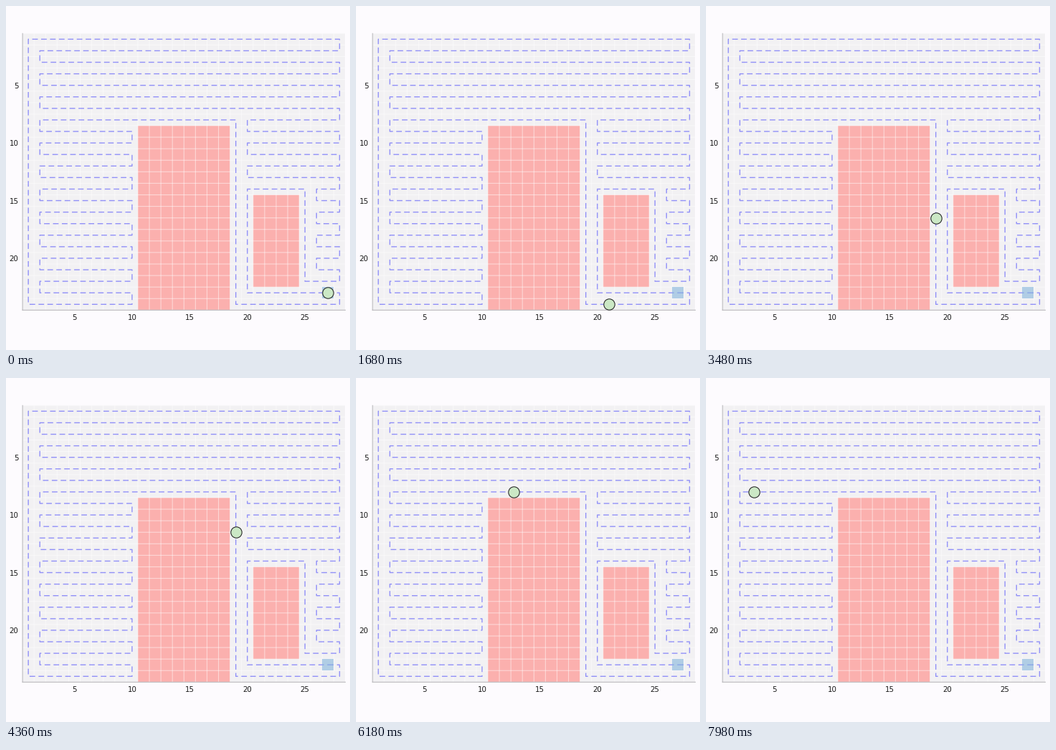
Animation of 480 by 480 pixels, one loop 8000 ms. Source, as a matplotlib script:

```python
import numpy as np
import matplotlib.pyplot as plt
from matplotlib.animation import FuncAnimation
from matplotlib.patches import Rectangle

SIZE, DPI = 480, 80
PX = 72 / DPI                 # one pixel in points
COLS, ROWS, CELL = 28, 24, 16.085
LEFT, TOP = 23.1, 38.3
STEP = 0.25                   # cells travelled per step
HOME = (27, 23)

plt.rcParams["font.family"] = "DejaVu Sans"
plt.rcParams["lines.scale_dashes"] = False


def sweep(first, last, start, end):
    """Corners of a back-and-forth sweep over rows first..last."""
    pts = []
    for y in range(first, last + 1):
        pts += [(start, y), (end, y)]
        start, end = end, start
    return pts


route = [HOME, (28, 23), (28, 24), (19, 24), (19, 8), (2, 8)]
route += sweep(9, 23, 2, 10)
route += [(10, 24), (1, 24), (1, 1), (28, 1)]
route += sweep(2, 7, 28, 2)
route += sweep(8, 13, 28, 20)
route += sweep(14, 21, 28, 26)
route += [(28, 22), (25, 22), (25, 14), (20, 14), (20, 23), HOME]
route = np.array(route, float)
dist = np.r_[0, np.cumsum(np.abs(np.diff(route, axis=0)).sum(axis=1))]


def locate(d):
    return np.interp(d, dist, route[:, 0]), np.interp(d, dist, route[:, 1])


def steps_at(tick):
    """Three steps every seven ticks: one held for five, two for one each."""
    cycle, phase = divmod(tick - 1, 7)
    return 1 + 3 * cycle + max(0, phase - 4)


fig = plt.figure(figsize=(SIZE / DPI, SIZE / DPI), dpi=DPI, facecolor="#fdfbfe")
w, h = COLS * CELL, ROWS * CELL
ax = fig.add_axes([LEFT / SIZE, 1 - (TOP + h) / SIZE, w / SIZE, h / SIZE],
                  facecolor="#f2f1f3")
ax.set_xlim(0.5, COLS + 0.5)
ax.set_ylim(ROWS + 0.5, 0.5)
ax.set_xticks(range(5, 26, 5))
ax.set_yticks(range(5, 21, 5))
ax.tick_params(length=0, labelsize=10.3 * PX, labelcolor="#1a1a1a", pad=5.6 * PX)
for side in ("top", "right"):
    ax.spines[side].set_visible(False)
for side in ("left", "bottom"):
    ax.spines[side].set(color="#b4b3b6", linewidth=1 * PX, snap=False)

for x, y, bw, bh in ((10.5, 8.5, 8, 16), (20.5, 14.5, 4, 8)):
    ax.add_patch(Rectangle((x, y), bw, bh, fc="#fbb0ae", lw=0, snap=False,
                           zorder=1))

grid = dict(colors="white", alpha=0.5, linewidth=1.1 * PX, snap=False, zorder=1.5)
ax.vlines(np.arange(COLS + 1) + 0.5, 0.5, ROWS + 0.5, **grid)
ax.hlines(np.arange(ROWS + 1) + 0.5, 0.5, COLS + 0.5, **grid)

ax.plot(route[:, 0], route[:, 1], color="blue", alpha=0.4, lw=1.4 * PX,
        dashes=(7.8 * PX, 4.62 * PX), dash_capstyle="butt", snap=False, zorder=2)
ax.plot(*HOME, "s", ms=15.4 * PX, mfc="#84b5dd", mew=0, alpha=0.6, snap=False,
        zorder=3)
robot, = ax.plot([], [], "o", ms=15.4 * PX, mfc="#cbe8c5", mec="#222222",
                 mew=1.05 * PX, clip_on=False, snap=False, zorder=4)


def update(tick):
    x, y = locate(steps_at(tick) * STEP)
    robot.set_data([x], [y])
    return robot,


anim = FuncAnimation(fig, update, frames=400, interval=20, repeat=True,
                     repeat_delay=0, blit=False)
plt.show()
```
